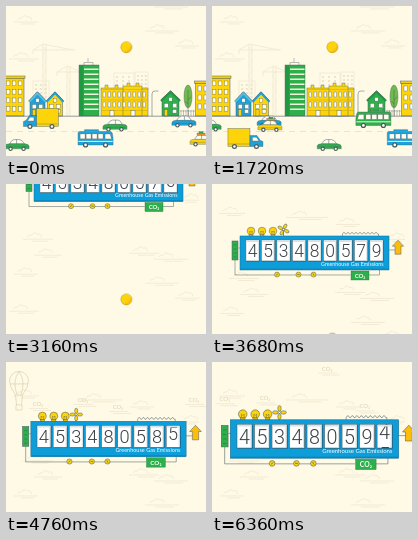
Recreate the animation shown at these times as an HTML page. Size 200 px wide and 150 px high, loop 6.4 s.

```html
<!DOCTYPE html>
<html lang="en">
<head>
<meta charset="utf-8">
<title>City emissions counter</title>
<style>
  html, body { margin: 0; width: 100%; height: 100%; overflow: hidden; background: #fffae6; }
  #stage { display: block; width: 100vw; height: 100vh; }
  text { font-family: Lato, "Open Sans", sans-serif; }
  .digit { font: 300 17.5px Roboto, "Open Sans", sans-serif; fill: #3d4348; text-anchor: middle; }
</style>
</head>
<body>
<svg id="stage" viewBox="0 0 200 150"></svg>
<script>
const LOOP = 6400;
const INK = '#4c5c62', YELLOW = '#fdd40a', GREEN = '#2fae4c', BLUE = '#1ba3da';
const WHITE = '#fffdf0', FAINT = '#ece4cd';
const stage = document.getElementById('stage');

function add(parent, tag, attrs = {}) {
  const node = document.createElementNS('http://www.w3.org/2000/svg', tag);
  for (const key in attrs) node.setAttribute(key, attrs[key]);
  return parent.appendChild(node);
}
const group = parent => add(parent, 'g');
const rect = (p, x, y, width, height, fill, stroke = 'none', sw = 0.5) =>
  add(p, 'rect', { x, y, width, height, fill, stroke, 'stroke-width': sw });
const path = (p, d, fill = 'none', stroke = INK, sw = 0.5) =>
  add(p, 'path', { d, fill, stroke, 'stroke-width': sw, 'stroke-linejoin': 'round' });
const disc = (p, cx, cy, r, fill, stroke = 'none', sw = 0.5) =>
  add(p, 'circle', { cx, cy, r, fill, stroke, 'stroke-width': sw });
function label(p, x, y, size, fill, words, extra = {}) {
  const node = add(p, 'text', { x, y, 'font-size': size, fill, ...extra });
  node.textContent = words;
  return node;
}
const move = (node, x, y, more = '') => node.setAttribute('transform', `translate(${x} ${y}) ${more}`);
const clamp = u => Math.max(0, Math.min(1, u));
const easeOut = u => 1 - (1 - u) ** 2;
const easeInOut = u => u < 0.5 ? 2 * u * u : 1 - 2 * (1 - u) ** 2;

// Sky
const sky = group(stage);
function cloud(x, y, w) {
  path(sky, `M${x - w / 2} ${y}h${w}M${x - w * 0.35} ${y - 2}q1-3 4-2q2-4 6-1q4-1 4 3M${x - w * 0.2} ${y + 2}h${w * 0.55}`,
    'none', FAINT, 0.7);
}
[[18, 53, 30], [156, 25, 34], [181, 40, 24], [32, -19, 30], [20, 16, 24], [165, 1, 34],
 [20, -84, 26], [95, -80, 42], [136, -73, 24], [42, -3, 28], [138, -5, 30], [184, -58, 18]]
  .forEach(c => cloud(...c));
const sun = group(sky);
disc(sun, 0, 0, 5.6, YELLOW);
path(sun, 'M-3 4.6A5.5 5.5 0 0 0 4.6-3Q4 3-3 4.6', '#f7bd1a', 'none');
disc(sun, 0.3, -0.2, 5.6, 'none', '#a8944e', 0.4);

// City
const city = group(stage);
const backdrop = group(city);
function crane(x, top, reach) {
  path(backdrop, `M${x} 110V${top}M${x + 3} 110V${top}M${x - 10} ${top + 6}h${reach}M${x} ${top}l${reach - 12} 6M${x} ${top}l-10 6v4`,
    'none', FAINT, 0.7);
  let d = `M${x} 110`;
  for (let i = 1; i * 5 < 110 - top; i++) d += `L${x + (i % 2) * 3} ${110 - i * 5}`;
  path(backdrop, d, 'none', FAINT, 0.5);
}
crane(37, 38, 42);
crane(61, 60, 26);
[[108, 67, 20], [129, 66, 13], [27, 75, 16]].forEach(([x, y, w]) => {
  rect(backdrop, x, y, w, 110 - y, 'none', FAINT, 0.7);
  for (let i = 0; i < 12; i++) rect(backdrop, x + 2 + (i % 3) * w * 0.3, y + 3 + (i / 3 | 0) * 4, 2, 2, FAINT);
});

function windows(p, x, y, cols, rows, dx, dy, w, h) {
  for (let i = 0; i < cols * rows; i++)
    rect(p, x + (i % cols) * dx, y + (i / cols | 0) * dy, w, h, WHITE, INK, 0.35);
}
function house(x, w, top, wall, roof) {
  const mid = x + w / 2;
  path(city, `M${x} 110V${top + 8}L${mid} ${top}L${x + w} ${top + 8}V110Z`, wall);
  path(city, `M${x - 1} ${top + 10}L${mid} ${top + 1}L${x + w + 1} ${top + 10}`, 'none', roof, 2);
  path(city, `M${x - 1.4} ${top + 9}L${mid} ${top - 0.4}L${x + w + 1.4} ${top + 9}`, 'none', INK, 0.5);
  windows(city, mid - 1.6, top + 6.5, 1, 1, 0, 0, 3.2, 3.6);
  windows(city, x + 2.2, top + 12.5, 2, 1, w - 8.4, 0, 4, 4.2);
  rect(city, x + 2.4, 103.5, 3.2, 6.5, YELLOW, INK, 0.4);
  rect(city, x + w - 6.4, 103.5, 4, 3.6, WHITE, INK, 0.4);
}

rect(city, -8, 72, 26, 38, YELLOW, INK);
rect(city, -8, 70, 27, 2.2, YELLOW, INK);
windows(city, 0.5, 75, 3, 4, 6, 8.5, 3.4, 4.6);
house(24, 15, 86, BLUE, '#58bfe6');
house(41.5, 15, 86, YELLOW, BLUE);

rect(city, 73, 59, 20, 51, GREEN, INK, 0.4);
rect(city, 73, 59, 4.5, 51, '#1f9a40');
path(city, 'M78 59v-2.5h9V59M82 56v-4', 'none', INK, 0.4);
for (let y = 62.5; y < 107; y += 5) rect(city, 78, y, 14.5, 1.5, '#eef7da');
rect(city, 95, 82, 47, 28, YELLOW, INK, 0.4);
rect(city, 117, 80, 19, 30, YELLOW, INK, 0.4);
path(city, 'M94.5 83.5H142.5M95 104.5H142M95 94H142', 'none', '#b59a1c', 0.4);
path(city, 'M99 82v-3h3v3M109 82v-3h3v3M121 80v-3h3v3M130 80v-3h3v3', YELLOW, INK, 0.4);
windows(city, 97, 86, 9, 2, 5, 10, 2.6, 5);
[104, 125].forEach(x => rect(city, x, 104.5, 4, 5.5, WHITE, INK, 0.4));
path(city, 'M146 110V88q0-3.5 3.5-3h3', 'none', INK, 0.5);

house(156, 17, 85, GREEN, '#1f9a40');
add(city, 'ellipse', { cx: 182, cy: 90.5, rx: 4, ry: 11.5, fill: '#6fbb4c', stroke: INK, 'stroke-width': 0.4 });
path(city, 'M182 110V84M182 94l2.5-3M182 98l-2.5-3');
rect(city, 189.5, 77, 24, 33, YELLOW, INK);
rect(city, 188.5, 75, 25, 2.2, YELLOW, INK);
windows(city, 192, 80, 3, 3, 6, 9, 3.4, 5);
let fence = 'M174 105h15';
for (let x = 175; x < 189; x += 2.5) fence += `M${x} 110v-6`;
path(city, fence, 'none', INK, 0.35);
path(city, 'M0 110.2H200', 'none', INK, 0.6);
add(city, 'path', { d: 'M0 125.5H200', stroke: '#ded5bd', 'stroke-width': 0.6, 'stroke-dasharray': '6 5' });

// Traffic: every vehicle is drawn facing right with its wheels resting on y = 0.
function wheels(p, r, ...xs) {
  xs.forEach(x => { disc(p, x, -r, r, INK); disc(p, x, -r, r * 0.5, WHITE); });
}
const makers = {
  car(p, color, loaded) {
    path(p, 'M-7.5-7Q-5.5-11.4-3-11.4H2.5Q5-11.2 7.5-7Z', WHITE, INK, 0.5);
    path(p, 'M-.5-11.4V-7');
    path(p, 'M-12-2.2V-5.3Q-11.5-7.1-7.5-7.2H7Q12-7 12-4.5V-2.2Z', color, INK, 0.4);
    path(p, 'M-11.5-4.2H11.5', 'none', INK, 0.3);
    if (loaded) { rect(p, -5, -13.4, 8, 2, '#f39a1f', INK, 0.4); rect(p, -3, -14.8, 4, 1.4, GREEN, INK, 0.4); }
    wheels(p, 2.2, -6.5, 6.5);
  },
  bus(p, color) {
    path(p, 'M-17.5-2.5V-14.5Q-17.5-16-16-16H15Q17-16 17.5-9V-2.5Z', color, INK, 0.4);
    for (let i = 0; i < 4; i++) rect(p, -15.5 + i * 6, -13.6, 5, 5, WHITE, INK, 0.35);
    path(p, 'M9.5-13.6H14.6L16-8.6H9.5Z', WHITE, INK, 0.35);
    rect(p, -17.2, -6.6, 34.3, 0.9, WHITE);
    path(p, 'M-11-16v-1.8H3V-16', color, INK, 0.4);
    wheels(p, 2.6, -10, 10);
  },
  truck(p) {
    rect(p, -17.5, -20.5, 22, 18, YELLOW, INK, 0.4);
    path(p, 'M4.5-2.5V-13.5H11.5L15-8.5L17.5-7.5V-2.5Z', BLUE, INK, 0.4);
    path(p, 'M7-8V-11.8H11L13.5-8Z', WHITE, INK, 0.35);
    path(p, 'M-17.5-5H4.5', 'none', INK, 0.35);
    wheels(p, 2.5, -11, 11);
  }
};
// kind, colour, direction, road y, then [time in s, x] points
const traffic = [
  ['bus', GREEN, -1, 122, [[1, 203], [2.36, 124.5]]],
  ['truck', YELLOW, -1, 123, [[0, 35], [1, -40]]],
  ['car', BLUE, -1, 121.5, [[0, 178], [1, 99], [2.36, 20]]],
  ['car', GREEN, -1, 125.5, [[0, 109], [1, 44]]],
  ['car', YELLOW, -1, 126, [[1, 148], [2, 23]], true],
  ['car', BLUE, -1, 126.5, [[1, 276], [2.36, 183]]],
  ['bus', BLUE, 1, 141.5, [[0, 89.5], [1, 149.5]]],
  ['car', YELLOW, 1, 140.5, [[0, 196], [1, 258]], true],
  ['car', GREEN, 1, 145, [[0, 11], [1, 73.5], [2.36, 156]]],
  ['truck', YELLOW, 1, 143, [[1, -14], [2.36, 75.5]]]
].map(([kind, color, dir, y, keys, loaded]) => {
  const node = group(city);
  makers[kind](node, color, loaded);
  return { node, dir, y, keys };
});
function along(keys, s) {
  let i = 0;
  while (i < keys.length - 2 && s > keys[i + 1][0]) i++;
  const [[t0, x0], [t1, x1]] = keys.slice(i, i + 2);
  return x0 + (x1 - x0) * (s - t0) / (t1 - t0);
}

// Drifting gas labels and balloon
const haze = group(stage);
const puffs = [[77, 40, -15, -1], [32, 44, -12, -3], [188, 40, -22, 4], [112, 47, 2, -24]].map(([x, y, vx, vy]) => {
  const node = group(haze);
  label(node, 0, 0, 6, '#ddd2b4', 'CO₂', { 'text-anchor': 'middle' });
  path(node, 'M-9 2.5H10M-5 4.5H13', 'none', FAINT, 0.7);
  return { node, x, y, vx, vy };
});
const balloon = group(stage);
path(balloon, 'M-3.5 14Q-9.5 6-9.5 0A9.5 9.5 0 0 1 9.5 0Q9.5 6 3.5 14ZM-2 14Q-7 0 0-9.5Q7 0 2 14M-9 3H9M-3.5 14L-2.5 24M3.5 14L2.5 24M-3 24H3V29H-3Z',
  'none', '#dccfae', 0.7);

// Counter, centred on its own origin
const meter = group(stage);
path(meter, 'M-79.5 7V22H36M54 22H65V17M-76-5h3M73-3H83');
let spring = 'M28-17v-2';
for (let i = 0; i < 18; i++) spring += `l1 ${i % 2 ? 1.5 : -1.5}l1 0`;
path(meter, spring + 'v2');
rect(meter, -82.5, -12, 6, 19, GREEN, INK);
path(meter, 'M-81-8h3M-81-4h3M-81 0h3M-81 4h3', 'none', '#16763a');
[-63.5, -52.5, -41.5].forEach(x => {
  path(meter, `M${x - 2} -18.5Q${x - 4} -20.5 ${x - 3.8} -22A3.8 3.8 0 0 1 ${x + 3.8} -22Q${x + 4} -20.5 ${x + 2} -18.5Z`, YELLOW);
  path(meter, `M${x - 1.2} -18.5V-22L${x} -20.8L${x + 1.2} -22V-18.5`, 'none', INK, 0.4);
  rect(meter, x - 2, -18.7, 4, 2, '#e5b90a', INK, 0.4);
});
path(meter, 'M-31-17v-6', 'none', INK, 0.7);
const fan = group(meter);
for (let a = 0; a < 360; a += 90)
  add(fan, 'ellipse', { cx: 0, cy: -3.6, rx: 1.5, ry: 2.5, fill: YELLOW, stroke: INK, 'stroke-width': 0.5, transform: `rotate(${a})` });
disc(fan, 0, 0, 1, WHITE, INK);

rect(meter, -74.5, -17, 149, 34, '#0d9ed9', '#17688f', 0.5);
rect(meter, -74.2, 15.6, 148.4, 1.2, '#0a86bd');
label(meter, 69, 12.6, 5.3, '#fff', 'Greenhouse Gas Emissions', { 'text-anchor': 'end' });
const reels = [];
for (let i = 0; i < 9; i++) {
  const x = (i - 4) * 15.5 - 6.6;
  rect(meter, x + 0.6, -12.4, 13.4, 21, '#0a6f9f');
  rect(meter, x, -13, 13.2, 21, '#fff', INK);
  const slot = add(meter, 'svg', { x, y: -13, width: 13.2, height: 21, viewBox: '0 0 13.2 21' });
  const strip = group(slot);
  const faces = [0, 21].map(dy => add(strip, 'text', { class: 'digit', x: 6.6, y: 17 + dy }));
  rect(slot, 0.4, 0.4, 12.4, 1.6, '#d9e3e6');
  rect(slot, 11.9, 0.4, 0.9, 20, '#d9e3e6');
  reels.unshift({ strip, faces });
}
[-37.5, -16, -1].forEach((x, i) => {
  disc(meter, x, 21.6, 2.5, YELLOW, INK);
  move(path(meter, 'M-1 .8L1-.8', 'none', INK, 0.6), x, 21.6, `rotate(${i * 50})`);
});
rect(meter, 36.5, 18, 18, 9, GREEN, '#1b7c35', 0.4);
label(meter, 45.5, 24.7, 6, '#fff', 'CO₂', { 'text-anchor': 'middle', 'font-weight': 700 });
const arrow = group(meter);
path(arrow, 'M0-7.5L5.6-1.5H3V6.5H-3V-1.5H-5.6Z', '#fdbd0a');

function setCounter(value) {
  reels.forEach(({ strip, faces }, place) => {
    const unit = 10 ** place;
    const digit = Math.floor(value / unit) % 10;
    const roll = Math.max(0, value % unit - unit + 1);
    const turn = place ? roll : value % 1;
    faces[0].textContent = digit;
    faces[1].textContent = (digit + 1) % 10;
    move(strip, 0, -21 * turn);
  });
}

function draw(t) {
  const s = t / 1000;
  const pan = easeInOut(clamp((t - 2145) / 1785));
  const zoom = 1 + 0.055 * Math.max(0, s - 4);

  move(sky, 0, 118 * pan);
  move(sun, 120.2, 41.3);
  move(city, 0, 206 * easeInOut(clamp((t - 2180) / 1750)));
  traffic.forEach(({ node, dir, y, keys }) => move(node, along(keys, s), y, `scale(${dir} 1)`));

  haze.setAttribute('opacity', clamp((s - 4) / 0.4));
  puffs.forEach(p => move(p.node, p.x + p.vx * (s - 4.76), p.y + p.vy * (s - 4.76)));
  const enter = easeOut(clamp((s - 4.1) / 0.66));
  const rise = Math.max(0, s - 4.76);
  move(balloon, -14 + 27 * enter, 34 - 15 * enter - 70 * rise);

  move(meter, 102.5, 77 - 206 * (1 - pan), `scale(${zoom})`);
  move(fan, -31, -23.5, `rotate(${(t - 4760) * 0.225})`);
  move(arrow, 83.5, -5 + Math.sin(s * 5) * 0.7);
  setCounter(453480579 + (t - 3680) / 176.3);
}

const start = performance.now();
function tick() {
  draw((performance.now() - start) % LOOP);
  requestAnimationFrame(tick);
}
tick();
</script>
</body>
</html>
```
